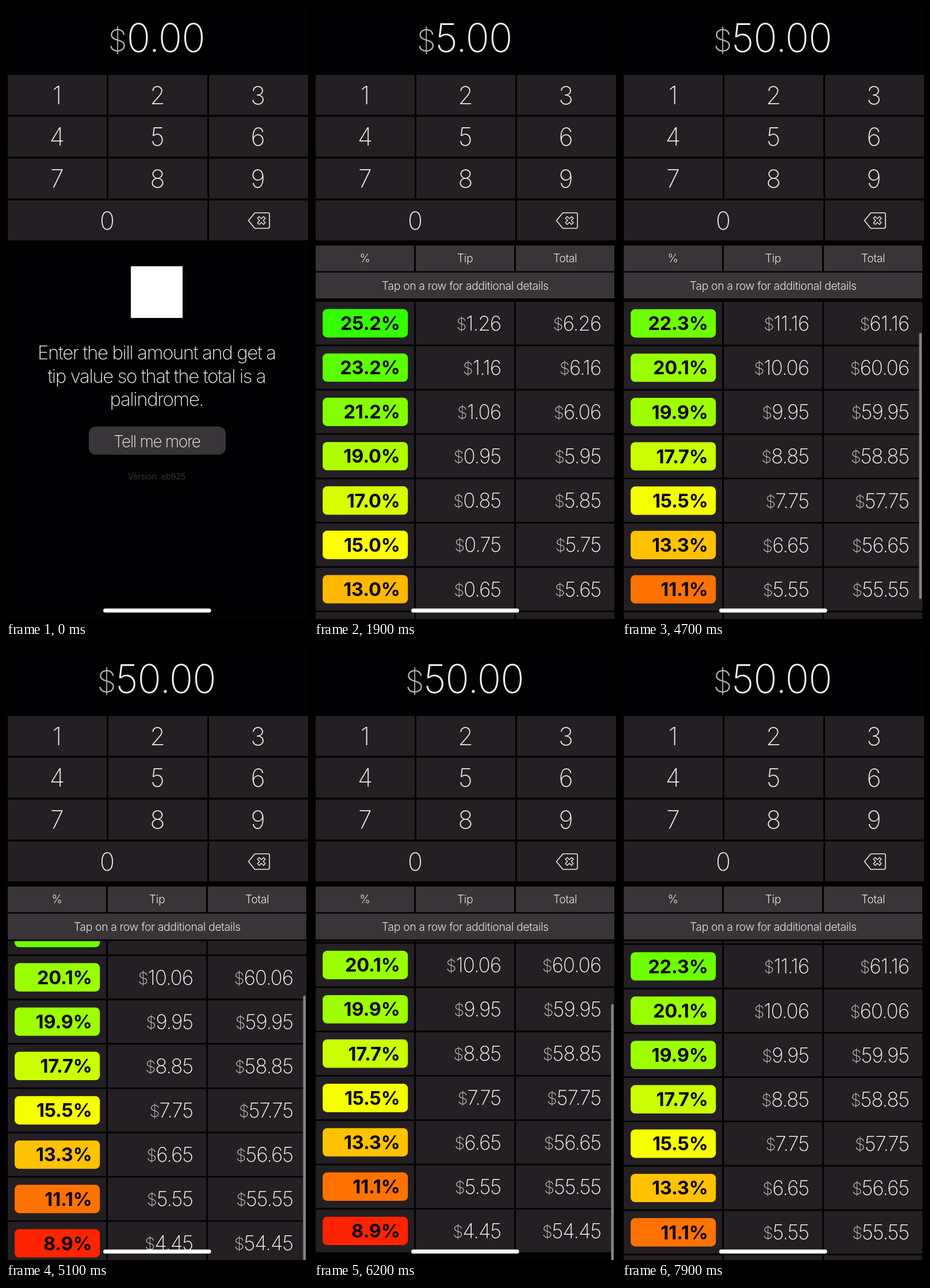
Animation of 525x1067 px, one loop 8 s. Source, as an HTML page:

```html
<!DOCTYPE html>
<html lang="en">
<head>
<meta charset="utf-8">
<title>Palindrome tip calculator</title>
<style>
  html, body { margin: 0; width: 100%; height: 100%; overflow: hidden; background: #020103; }
  svg { display: block; width: 100vw; height: 100vh; }
  text {
    font-family: Inter, "Open Sans", sans-serif;
    font-optical-sizing: none;
    font-weight: 200;
    fill: #f6f4f6;
    text-anchor: middle;
    letter-spacing: -.043em;
    white-space: pre;
  }
  .amount { font-size: 68.5px; letter-spacing: -.012em; }
  .amount tspan:first-child { font-size: 53px; fill: #b4b2b4; }
  .key { font-size: 43px; fill: #e8e6e8; }
  .intro { font-size: 33px; font-weight: 250; }
  .button { font-size: 28px; font-weight: 250; letter-spacing: -.047em; }
  .version { font-size: 14.5px; font-weight: 300; fill: #434043; letter-spacing: -.01em; }
  .head { font-size: 19.5px; font-weight: 300; fill: #e4e2e4; letter-spacing: -.022em; }
  .money { font-size: 35px; text-anchor: end; letter-spacing: -.031em; }
  .money tspan:first-child { font-size: 29px; fill: #c4c2c4; }
  .percent { font-size: 32.5px; font-weight: 700; fill: #060306; text-anchor: end; letter-spacing: -.005em; }
</style>
</head>
<body>
<svg id="stage" viewBox="0 0 525 1067" preserveAspectRatio="none"></svg>
<script>
const LOOP = 8000, STEP = 100;
const KEY = '#231f22', PANEL = '#393437';
const ROW_TOP = 515, ROW_PITCH = 77.15;
const COLUMNS = [3, 177, 351];

// [time, bill in cents]
const BILLS = [[0, 0], [900, 5], [1500, 50], [1900, 500], [2300, 5000]];
// [time, scroll offset, speed per ms]
const SCROLL = [[3800, 0, 0], [5100, 131.5, .13], [5700, 241, 0], [6200, 153, -.138], [6900, 73.5, 0]];

const stage = document.getElementById('stage');

function add(parent, tag, attrs = {}, content) {
  const node = document.createElementNS('http://www.w3.org/2000/svg', tag);
  for (const name in attrs) node.setAttribute(name, attrs[name]);
  if (content !== undefined) node.textContent = content;
  parent.append(node);
  return node;
}
const group = (parent, attrs) => add(parent, 'g', attrs);
const box = (parent, x, y, width, height, fill, rx = 0) =>
  add(parent, 'rect', { x, y, width, height, fill, rx });
const label = (parent, cls, x, y, content) => add(parent, 'text', { class: cls, x, y }, content);
const show = (node, visible) => node.setAttribute('display', visible ? 'inline' : 'none');

function money(parent, cls, x, y, cents) {
  const text = label(parent, cls, x, y);
  add(text, 'tspan', { dy: -1 }, '$');
  add(text, 'tspan', { dy: 1 }, (cents / 100).toFixed(2));
}

function buildKeypad() {
  for (let i = 0; i < 9; i++) {
    const col = i % 3, row = Math.floor(i / 3);
    box(stage, 3 + 175 * col, 120 + 72.8 * row, 172, 69.5, KEY);
    label(stage, 'key', 88 + 174.5 * col, 170.5 + 72.8 * row, i + 1);
  }
  box(stage, 3, 338.4, 347, 69.5, KEY);
  box(stage, 353, 338.4, 172, 69.5, KEY);
  label(stage, 'key', 175, 389, 0);
  const icon = group(stage, { fill: 'none', stroke: '#eceaec', 'stroke-width': 1.6, 'stroke-linejoin': 'round' });
  add(icon, 'path', { d: 'M421.5 373.5L432.5 360H455.5Q458 360 458 362.5V384.5Q458 387 455.5 387H432.5Z' });
  add(icon, 'path', {
    d: 'M-2.2 -7.5h4.4v5.3h5.3v4.4h-5.3v5.3h-4.4v-5.3h-5.3v-4.4h5.3z',
    transform: 'translate(444 373.3) rotate(45)', 'stroke-width': 1.4
  });
}

function buildWelcome() {
  const g = group(stage);
  box(g, 217, 453, 90, 90, '#fff');
  ['Enter the bill amount and get a', 'tip value so that the total is a', 'palindrome.']
    .forEach((line, i) => label(g, 'intro', 261.8, 615 + 40.7 * i, line));
  box(g, 144, 732, 238, 49, PANEL, 12);
  label(g, 'button', 262.3, 767.5, 'Tell me more');
  label(g, 'version', 262.3, 823.5, 'Version. eb925');
  return g;
}

function buildHeader() {
  const g = group(stage);
  ['%', 'Tip', 'Total'].forEach((name, i) => {
    box(g, COLUMNS[i], 417, 171, 44.5, PANEL);
    label(g, 'head', COLUMNS[i] + 85.5, 446, name);
  });
  box(g, 3, 464, 519, 45, PANEL);
  label(g, 'head', 262.8, 494, 'Tap on a row for additional details');
  return g;
}

function pillColor(percent) {
  const hue = 60 + (percent - 15) * (percent > 15 ? 4.7 : 8.5);
  return `hsl(${hue} 100% 50%)`;
}

const isPalindrome = n => String(n) === [...String(n)].reverse().join('');

function buildTable(parent, bill) {
  const g = group(parent);
  let y = ROW_TOP;
  for (let total = Math.floor(bill * 1.26); total > bill * 1.08; total--) {
    if (!isPalindrome(total)) continue;
    const tip = total - bill, percent = 100 * tip / bill;
    for (const x of COLUMNS) box(g, x, y, 171, 74.3, KEY);
    box(g, 15, y + 12.5, 148.2, 49.4, pillColor(percent), 8);
    label(g, 'percent', 149.5, y + 49, percent.toFixed(1) + '%');
    money(g, 'money', 325, y + 49.7, tip);
    money(g, 'money', 499, y + 49.7, total);
    y += ROW_PITCH;
  }
  return g;
}

const amounts = BILLS.map(([, cents]) => {
  const g = group(stage);
  money(g, 'amount', 261.7, 79.5, cents);
  return g;
});
buildKeypad();
const welcome = buildWelcome();
const header = buildHeader();

const clip = add(add(stage, 'defs'), 'clipPath', { id: 'list' });
box(clip, 0, 512, 525, 555, '#fff');
const list = group(stage, { 'clip-path': 'url(#list)' });
const tables = BILLS.map(([, cents]) => cents < 100 ? group(list) : buildTable(list, cents));
const scrollbar = box(list, 516.5, 516, 4.5, 463, '#858285', 2.2);
box(stage, 169, 1048.8, 187.5, 7, '#fff', 3.5);

function scrollAt(t) {
  const last = SCROLL[SCROLL.length - 1];
  if (t <= SCROLL[0][0]) return 0;
  if (t >= last[0]) return last[1];
  const i = SCROLL.findIndex(([time]) => time > t);
  const [t0, a, va] = SCROLL[i - 1], [t1, b, vb] = SCROLL[i];
  const d = t1 - t0, u = (t - t0) / d, w = 1 - u;
  return w * w * ((1 + 2 * u) * a + u * d * va) + u * u * ((3 - 2 * u) * b - w * d * vb);
}

function render(t) {
  const current = BILLS.filter(([time]) => time <= t).length - 1;
  amounts.forEach((node, i) => show(node, i === current));
  tables.forEach((node, i) => show(node, i === current));
  show(welcome, current === 0);
  show(header, current > 0);

  const offset = scrollAt(t);
  tables[current].setAttribute('transform', `translate(0 ${-offset})`);
  scrollbar.setAttribute('y', 516 + .69 * offset);
  const fade = Math.min(1, Math.max(0, (7900 - t) / 300));
  scrollbar.setAttribute('opacity', t > SCROLL[0][0] ? fade : 0);
}

const start = performance.now();
function tick() {
  const t = (performance.now() - start) % LOOP;
  render(Math.floor(t / STEP) * STEP);
  requestAnimationFrame(tick);
}
tick();
</script>
</body>
</html>
```
